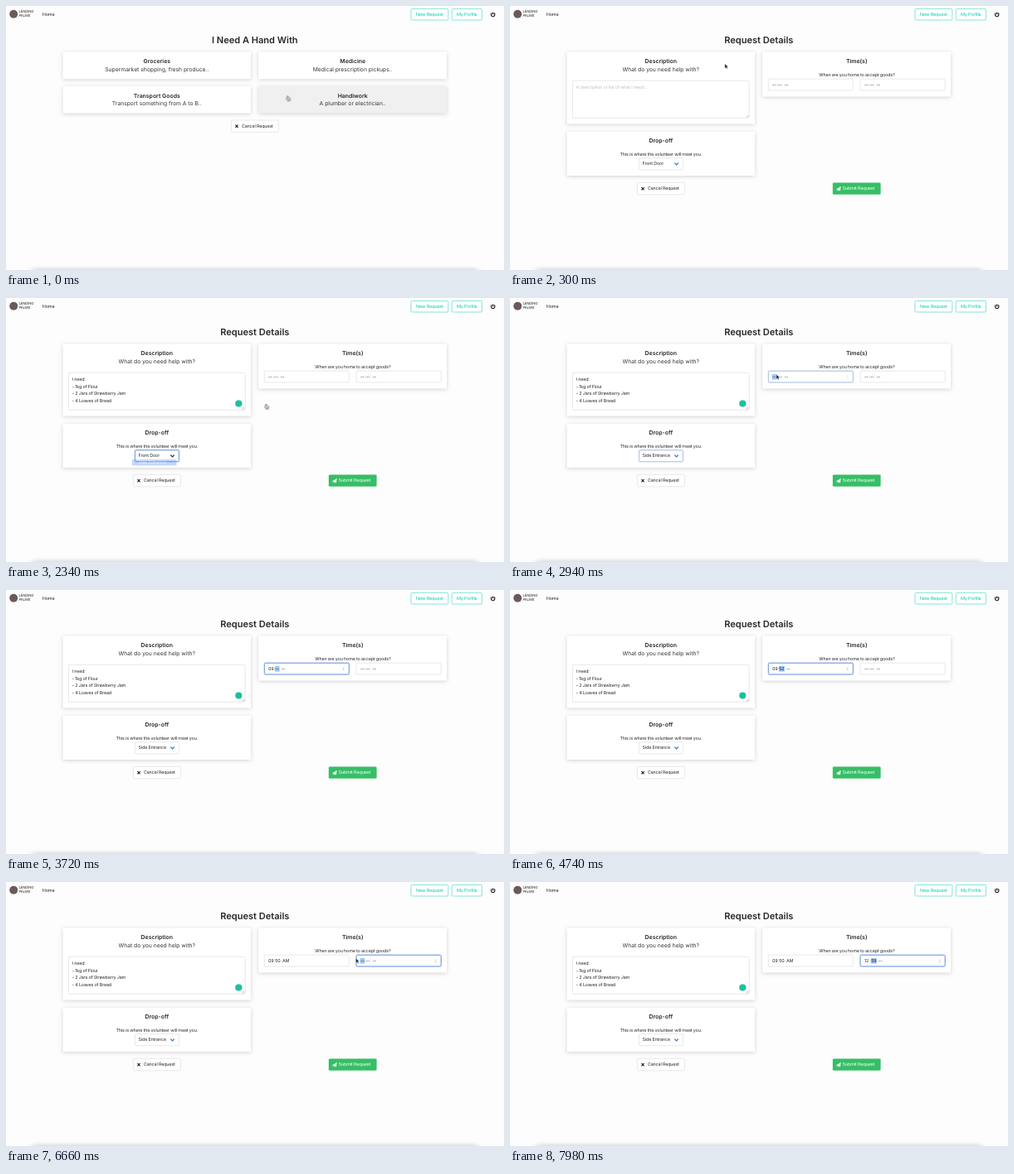
An HTML page that plays this animation: 600 px wide and 319 px high, repeating every 8 s.

```html
<!DOCTYPE html>
<html lang="en">
<head>
<meta charset="utf-8">
<title>Request form</title>
<style>
html, body { margin: 0; height: 100%; overflow: hidden; background: #fdfdfd; }
svg { display: block; width: 100%; height: 100%; font: 5.4px Inter, "Liberation Sans", sans-serif; letter-spacing: -.03em; text-rendering: geometricPrecision; }
text { fill: #262626; dominant-baseline: central; white-space: pre; }
.mid { text-anchor: middle; }
.title { font-size: 11.05px; font-weight: 600; letter-spacing: 0; }
.head { font-size: 6.9px; font-weight: 600; letter-spacing: 0; }
.sub { font-size: 6.75px; fill: #363636; letter-spacing: 0; }
.nav { font-size: 5.5px; }
.teal { fill: #00cdb0; }
.white { fill: #fff; }
.brand { font-size: 4.3px; }
.card { fill: #fff; filter: drop-shadow(0 1.6px 2.6px rgba(0,0,0,.17)); }
.box { fill: #fff; stroke: #d8d8d8; stroke-width: .6; }
.ring { fill: none; stroke: #6696e6; stroke-width: 1; }
.icon { fill: none; stroke: #222; stroke-width: 1.2; }

/* One 8 s clock: 1% = 80 ms */
.anim { animation: 8s step-end infinite; }
.fade { animation: 8s linear infinite; }
#pick { animation-name: pick; }
#form { animation-name: form; }
#hint { animation-name: hint; }
#note { animation-name: note; }
#noteRing { animation-name: noteRing; }
#dropRing { animation-name: dropRing; }
#menu { animation-name: menu; }
#choice { animation-name: choice; }
#front { animation-name: front; }
#side { animation-name: side; }
#ringA { animation-name: ringA; }
#ringB { animation-name: ringB; }
#chev { animation-name: chev; }
#pointer { animation: move 8s ease-in-out infinite; }
#shown { animation-name: shown; }
#arrow { animation-name: arrow; }
#hand { animation-name: hand; }

@keyframes pick { 0% { visibility: visible } .75%, 100% { visibility: hidden } }
@keyframes form { 0% { visibility: hidden } .75%, 100% { visibility: visible } }
@keyframes hint { 0% { opacity: 1 } 17.25%, 100% { opacity: 0 } }
@keyframes note { 0% { opacity: 0 } 17.25%, 100% { opacity: 1 } }
@keyframes noteRing { 0%, 12.75% { opacity: 0 } 14.25%, 23.3% { opacity: 1 } 24.75%, 100% { opacity: 0 } }
@keyframes dropRing { 0%, 23.3% { opacity: 0 } 24.75%, 36% { opacity: 1 } 37.5%, 100% { opacity: 0 } }
@keyframes menu { 0%, 23.5% { opacity: 0 } 24%, 27.75% { opacity: 1 } 29%, 100% { opacity: 0 } }
@keyframes choice { 0%, 25.4% { opacity: 0 } 25.5%, 27.75% { opacity: 1 } 29.25% { opacity: .33 } 30.75%, 100% { opacity: 0 } }
@keyframes front { 0% { opacity: 1 } 30.5%, 100% { opacity: 0 } }
@keyframes side { 0% { opacity: 0 } 30.5%, 100% { opacity: 1 } }
@keyframes ringA { 0%, 36% { opacity: 0 } 37.5%, 81.75% { opacity: 1 } 83.25%, 100% { opacity: 0 } }
@keyframes ringB { 0%, 81.75% { opacity: 0 } 83.25%, 100% { opacity: 1 } }
@keyframes chev { 0% { stroke: #2f68dc } 21% { stroke: #222 } 36%, 100% { stroke: #2f68dc } }
@keyframes shown {
  0% { opacity: 1 } 17.25% { opacity: 0 } 18% { opacity: 1 } 38.5% { opacity: 0 }
  78% { opacity: 1 } 87.75%, 100% { opacity: 0 }
}
@keyframes arrow { 0% { opacity: 0 } .75% { opacity: 1 } 28.5% { opacity: 0 } 31.5%, 100% { opacity: 1 } }
@keyframes hand { 0% { opacity: 1 } .75% { opacity: 0 } 28.5% { opacity: 1 } 31.5%, 100% { opacity: 0 } }
@keyframes move {
  0%, .75% { transform: translate(337.4px, 108.4px) }
  3.6%, 8.25% { transform: translate(258.8px, 69.8px) }
  13.5%, 18% { transform: translate(190px, 101px) }
  21.6%, 23.5% { transform: translate(194.6px, 191.2px) }
  26.5%, 27.75% { transform: translate(188px, 198px) }
  29.1%, 30% { transform: translate(311.4px, 128px) }
  36%, 77.5% { transform: translate(321px, 92.5px) }
  82%, 100% { transform: translate(421.6px, 92.2px) }
}
</style>
</head>
<body>
<svg viewBox="0 0 600 319" preserveAspectRatio="none">
  <defs>
    <filter id="soft" x="-10%" y="-300%" width="120%" height="700%"><feGaussianBlur stdDeviation="4 2"/></filter>
    <g id="cancel">
      <rect class="box" width="57" height="14.4" rx="1.4"/>
      <path class="icon" d="M5.1 5.7l3.2 3.2m0-3.2l-3.2 3.2"/>
      <text x="12.6" y="7.5">Cancel Request</text>
    </g>
    <path id="steps" d="M-1 -.6L0 -1.9 1 -.6ZM-1 .6L0 1.9 1 .6Z" fill="#aaa"/>
  </defs>

  <rect width="600" height="319" fill="#fdfdfd"/>
  <rect x="32" y="317" width="536" height="6" fill="#000" opacity=".15" filter="url(#soft)"/>

  <circle cx="9.2" cy="9.8" r="5" fill="#6b5a5c"/>
  <text class="brand" x="15.6" y="7.2">LENDING</text>
  <text class="brand" x="15.6" y="12.6">PALMS</text>
  <text class="nav" x="43.8" y="10.5">Home</text>
  <g fill="#fff" stroke="#35d6be" stroke-width=".6">
    <rect x="488" y="3.4" width="44.8" height="13.6" rx="1.4"/>
    <rect x="537.2" y="3.4" width="36.2" height="13.6" rx="1.4"/>
  </g>
  <text class="nav mid teal" x="510.4" y="10.6">New Request</text>
  <text class="nav mid teal" x="555.3" y="10.6">My Profile</text>
  <path class="icon" d="M585.4 8.6a2.2 2.2 0 1 0 2.6 0M586.7 7.6v2.7"/>

  <g id="pick" class="anim">
    <text class="title mid" x="299.8" y="41.4">I Need A Hand With</text>
    <rect class="card" x="68.5" y="55.5" width="226.5" height="32.7" rx="1"/>
    <rect class="card" x="304.3" y="55.5" width="226.7" height="32.7" rx="1"/>
    <rect class="card" x="68.5" y="97" width="226.5" height="32.4" rx="1"/>
    <rect class="card" x="304.3" y="97" width="226.7" height="32.4" rx="1" style="fill:#f0f0f0"/>
    <text class="head mid" x="181.8" y="66.9">Groceries</text>
    <text class="sub mid" x="181.8" y="76.6">Supermarket shopping, fresh produce..</text>
    <text class="head mid" x="417.7" y="66.9">Medicine</text>
    <text class="sub mid" x="417.7" y="76.6">Medical prescription pickups..</text>
    <text class="head mid" x="181.8" y="108">Transport Goods</text>
    <text class="sub mid" x="181.8" y="117.8">Transport something from A to B..</text>
    <text class="head mid" x="417.7" y="108">Handiwork</text>
    <text class="sub mid" x="417.7" y="117.8">A plumber or electrician..</text>
    <use href="#cancel" x="271.3" y="138"/>
  </g>

  <g id="form" class="anim">
    <text class="title mid" x="299.8" y="41.4">Request Details</text>
    <rect class="card" x="68.5" y="55.5" width="226.5" height="87" rx="1"/>
    <rect class="card" x="304.3" y="55.5" width="226.7" height="54" rx="1"/>
    <rect class="card" x="68.5" y="152" width="226.5" height="53" rx="1"/>

    <text class="head mid" x="181.8" y="66.9">Description</text>
    <text class="sub mid" x="181.8" y="76.6">What do you need help with?</text>
    <rect class="box" x="75.4" y="90.2" width="212.8" height="45.2" rx="1"/>
    <path class="icon" d="M284.6 134.6l2.8-2.8m-1.2 2.8l1.2-1.2" style="stroke:#888;stroke-width:.5"/>
    <text id="hint" class="anim" x="79.6" y="98.9" style="fill:#c0c0c0">A description or list of what I need...</text>
    <g id="note" class="anim">
      <text x="79.6" y="98.9">I need:</text>
      <text x="79.6" y="107.6">- 1kg of Flour</text>
      <text x="79.6" y="116.3">- 2 Jars of Strawberry Jam</text>
      <text x="79.6" y="125">- 4 Loaves of Bread</text>
      <circle cx="280.3" cy="127.5" r="4.1" fill="#15c39a"/>
    </g>
    <rect id="noteRing" class="ring fade" x="75.4" y="90.2" width="212.8" height="45.2" rx="1"/>

    <text class="head mid" x="181.8" y="162.1">Drop-off</text>
    <text class="mid" x="181.8" y="180">This is where the volunteer will meet you.</text>
    <rect class="box" x="155.4" y="183.8" width="53" height="14" rx="1.2"/>
    <text id="front" class="anim" x="159.6" y="191.1">Front Door</text>
    <text id="side" class="anim" x="159.6" y="191.1">Side Entrance</text>
    <path id="chev" class="icon anim" d="M198.3 189.6l2.2 2.2 2.2-2.2"/>
    <rect id="dropRing" class="ring fade" x="155.4" y="183.8" width="53" height="14" rx="1.2"/>
    <g id="menu" class="fade">
      <rect x="151.4" y="185.6" width="54.4" height="18" rx="1.4" fill="#fff" stroke="#ccc" stroke-width=".4"/>
      <text x="159.6" y="191.1">Front Door</text>
      <text x="159.6" y="199.1">Side Entrance</text>
    </g>
    <g id="choice" class="fade">
      <rect x="151.8" y="195.1" width="53.6" height="7.3" fill="#4a86f7"/>
      <text class="white" x="159.6" y="199.1">Side Entrance</text>
    </g>

    <text class="head mid" x="417.7" y="66.9">Time(s)</text>
    <text class="mid" x="417.9" y="84.4">When are you home to accept goods?</text>
    <rect class="box" x="311.3" y="88.2" width="102" height="13.8" rx="1.2"/>
    <rect class="box" x="422" y="88.2" width="102.2" height="13.8" rx="1.2"/>
    <g id="ringA" class="fade">
      <rect class="ring" x="311.3" y="88.2" width="102" height="13.8" rx="1.2"/>
      <use href="#steps" x="406.8" y="95.3"/>
    </g>
    <g id="ringB" class="fade">
      <rect class="ring" x="422" y="88.2" width="102.2" height="13.8" rx="1.2"/>
      <use href="#steps" x="517.6" y="95.3"/>
    </g>
    <g id="from" transform="translate(315.7 95.8)"></g>
    <g id="until" transform="translate(426.6 95.8)"></g>

    <use href="#cancel" x="153.3" y="213.4"/>
    <rect x="388.8" y="213.4" width="57.8" height="14.4" rx="1.4" fill="#37be66"/>
    <path d="M392.9 221.4l5.8-3.4-.9 5.4-1.9-.8-1.1 1.3-.1-1.8 2.6-2.7-3.2 2.5z" fill="#fff"/>
    <text class="nav white" x="400.6" y="221">Submit Request</text>
  </g>

  <g id="pointer"><g id="shown" class="anim">
    <path id="arrow" class="anim" d="M0 0V5.4L1.3 4.3 2.2 6.3 3.2 5.9 2.3 3.9H4Z" fill="#000" stroke="#fff" stroke-width=".4"/>
    <g id="hand" class="anim">
      <path transform="scale(.88)" d="M1.6 4V.9a.6.6 0 0 1 1.2 0V2.7c.5-.4 1-.2 1.1.1.5-.3 1-.1 1.1.3.5-.1.8.2.8.7V5c0 1-.6 1.4-.6 2.1H2.2C2 6.2.6 5 .3 4.3c-.2-.7.6-1 1.3-.3zM3 4.6v1.4M4.2 4.6v1.4" fill="#fff" stroke="#222" stroke-width=".65"/>
    </g>
  </g></g>
</svg>
<script>
const LOOP = 8000, BLANK = '--';

function make(parent, tag, attrs = {}) {
  const el = document.createElementNS('http://www.w3.org/2000/svg', tag);
  for (const key in attrs) el.setAttribute(key, attrs[key]);
  return parent.appendChild(el);
}

// A time input: hour, minute and AM/PM slots, one of them highlighted.
function timeField(id) {
  const root = document.getElementById(id);
  const mark = make(root, 'rect', { y: -3.8, height: 6.6, fill: '#9dc5f8' });
  const slots = [0, 1, 2].map(() => make(root, 'text'));
  const colon = make(root, 'text');
  colon.textContent = ':';
  return (values, active) => {
    let x = 0;
    mark.setAttribute('visibility', active < 0 ? 'hidden' : 'inherit');
    values.forEach((value, i) => {
      const width = value === BLANK ? 5.6 : i === 2 ? 8.9 : 6.8;
      slots[i].textContent = value;
      slots[i].setAttribute('x', x + .3);
      if (i === active) {
        mark.setAttribute('x', x);
        mark.setAttribute('width', width);
      }
      x += width;
      if (i === 0) colon.setAttribute('x', x);
      x += i === 0 ? 1.5 : 1.9;
    });
  };
}

// Latest value whose start time has passed.
const at = (t, steps) => steps.reduce((now, [start, value]) => t >= start ? value : now, null);

// Counts down from a first value, one per `every` ms, stopping at `last`.
function countdown(t, start, every, first, last) {
  if (t < start) return BLANK;
  return String(Math.max(last, first - Math.floor((t - start) / every))).padStart(2, '0');
}

const from = timeField('from'), until = timeField('until');

function draw() {
  const t = performance.now() % LOOP;
  from([
    countdown(t, 3180, 120, 12, 9),
    countdown(t, 3960, 100, 59, 50),
    at(t, [[0, BLANK], [5400, 'PM'], [5990, 'AM']])
  ], at(t, [[0, -1], [2940, 0], [3700, 1], [5100, 2], [6560, -1]]));
  until([
    at(t, [[0, BLANK], [7080, '12']]),
    at(t, [[0, BLANK], [7560, '59'], [7860, '58'], [7960, '59']]),
    BLANK
  ], at(t, [[0, -1], [6560, 0], [7380, 1]]));
  requestAnimationFrame(draw);
}
draw();
</script>
</body>
</html>
```
